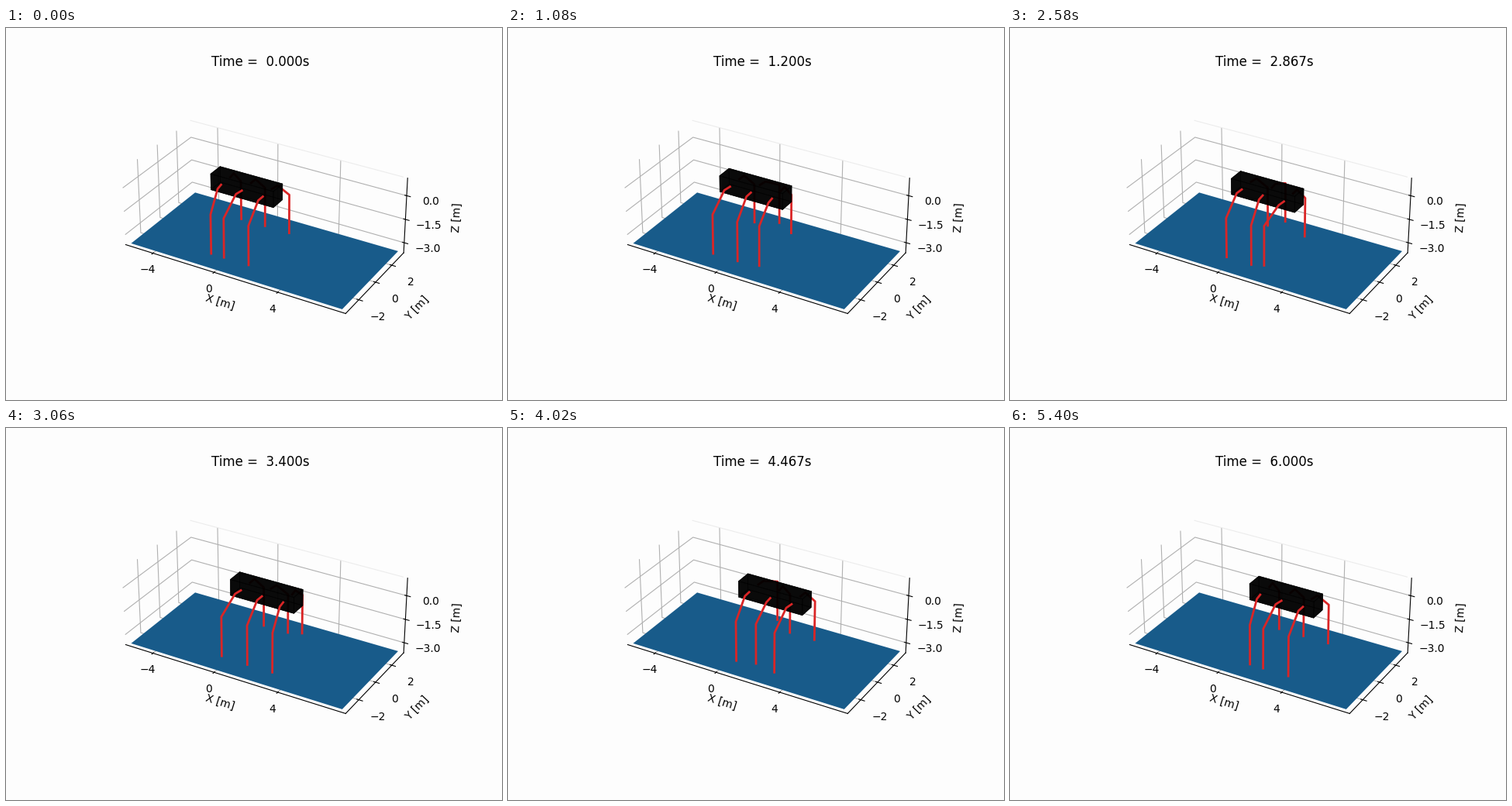
These frames come from a looping animation (640x480 px, 5.46 s). A matplotlib script:

```python
import numpy as np
import matplotlib.pyplot as plt
from matplotlib.animation import FuncAnimation
from mpl_toolkits.mplot3d.art3d import Poly3DCollection

FRAMES, INTERVAL, RATE = 91, 60, 15
PAPER, FLOOR, RED = "#fdfdfd", "#185b8a", "#da2526"

# Robot geometry in metres
BODY = np.array([4.0, 1.0, 1.0])
COXA, FEMUR, TIBIA = 0.5, 1.5, 2.5
REACH = COXA + FEMUR * np.sqrt(0.5)
GROUND = FEMUR * np.sqrt(0.5) + TIBIA
HIP_X = 4 / 3

# Gait: three leg groups swing one after the other
SPEED = 0.375
SWING = 10
HALF_STRIDE = 0.25
LIFT = np.radians(24)

# (hip x, side, swing group); side -1 is nearest the viewer
LEGS = [(-HIP_X, 1, 0), (0, 1, 1), (HIP_X, 1, 2),
        (-HIP_X, -1, 2), (0, -1, 0), (HIP_X, -1, 1)]


def gait(i, group):
    """Foot offset along x and femur lift for one leg group."""
    phase = (i - SWING * group) % (3 * SWING) / SWING
    if phase < 1:
        return -HALF_STRIDE * np.cos(np.pi * phase), LIFT * np.sin(np.pi * phase)
    return HALF_STRIDE * (2 - phase), 0.0


def leg_points(i, hip_x, side, group):
    dx, lift = gait(i, group)
    yaw = np.arctan2(dx, REACH)
    rho = np.hypot(dx, REACH) - COXA
    dist = np.hypot(rho, GROUND)
    bend = np.arccos((FEMUR**2 + dist**2 - TIBIA**2) / (2 * FEMUR * dist))
    femur = np.arctan2(GROUND, rho) - bend
    tibia = np.arctan2(GROUND - FEMUR * np.sin(femur),
                       rho - FEMUR * np.cos(femur))
    femur -= lift
    r = np.cumsum([0, COXA, FEMUR * np.cos(femur), TIBIA * np.cos(tibia)])
    z = -np.cumsum([0, 0, FEMUR * np.sin(femur), TIBIA * np.sin(tibia)])
    x = SPEED * i / RATE + hip_x + r * np.sin(yaw)
    y = side * (BODY[1] / 2 + r * np.cos(yaw))
    return x, y, z


def body_faces(x):
    faces = []
    for axis in range(3):
        for sign in (-1, 1):
            quad = np.full((4, 3), float(sign))
            a, b = (k for k in range(3) if k != axis)
            quad[:, a] = [-1, 1, 1, -1]
            quad[:, b] = [-1, -1, 1, 1]
            faces.append(quad * BODY / 2 + [x, 0, 0])
    return faces


low = np.array([-2 - GROUND, -3.375, -GROUND])
high = np.array([4.25 + GROUND, 3.375, 1.0])
pad = (high - low) / 48
box_low, box_high = low - pad, high + pad

fig = plt.figure(figsize=(6.4, 4.8), dpi=100, facecolor=PAPER)
ax = fig.add_subplot(projection="3d", computed_zorder=False)
ax.set_facecolor(PAPER)
ax.view_init(elev=30, azim=-60)

floor = [(x, y, low[2]) for x, y in
         ((low[0], low[1]), (high[0], low[1]),
          (high[0], high[1]), (low[0], high[1]))]
ax.add_collection3d(Poly3DCollection([floor], facecolors=FLOOR, zorder=1))
body = Poly3DCollection(body_faces(0), facecolors=(0, 0, 0, 0.8),
                        edgecolors=(0, 0, 0, 0.8), linewidths=0.5, zorder=3)
ax.add_collection3d(body)
legs = [ax.plot(*leg_points(0, *leg), color=RED, lw=2,
                zorder=2 if leg[1] > 0 else 4)[0] for leg in LEGS]

# Faint upper rim of the back wall
ax.plot([box_low[0], box_high[0]], [box_high[1]] * 2, [box_high[2]] * 2,
        color="#ececec", lw=0.8, zorder=0)

ax.set(xlim=(box_low[0], box_high[0]), ylim=(box_low[1], box_high[1]),
       zlim=(box_low[2], box_high[2]),
       xticks=[-4, 0, 4], yticks=[-2, 0, 2], zticks=[-3, -1.5, 0],
       xlabel="X [m]", ylabel="Y [m]", zlabel="Z [m]")
ax.set_box_aspect(tuple(high - low))
for axis in (ax.xaxis, ax.yaxis, ax.zaxis):
    axis.set_pane_color(PAPER)
title = ax.set_title("")


def update(i):
    t = i / RATE
    title.set_text(f"Time =  {t:.3f}s")
    body.set_verts(body_faces(SPEED * t))
    for line, leg in zip(legs, LEGS):
        line.set_data_3d(*leg_points(i, *leg))
    return [title, body, *legs]


anim = FuncAnimation(fig, update, frames=FRAMES, interval=INTERVAL,
                     repeat=True, repeat_delay=0, blit=False)
plt.show()
```
